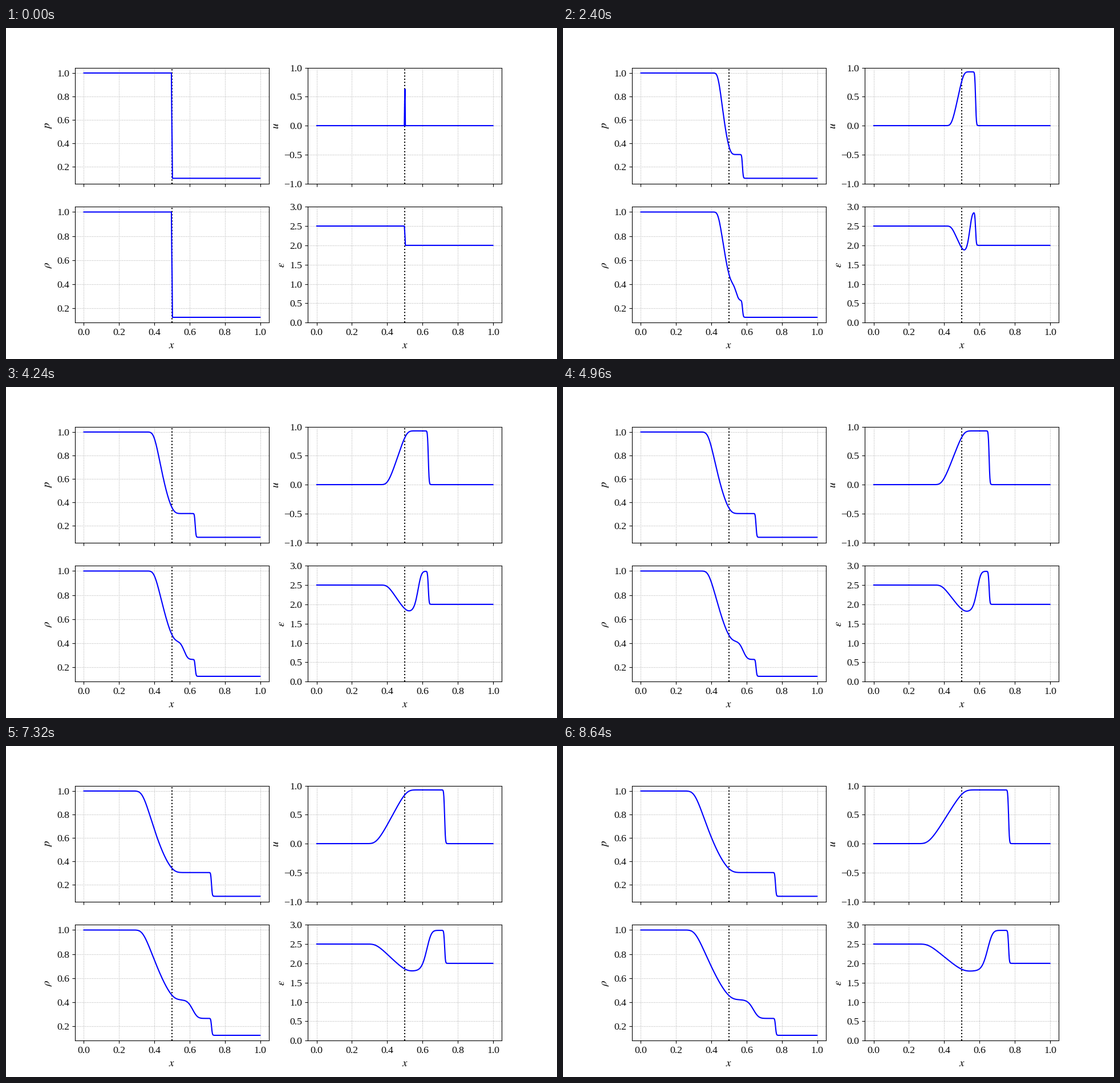
Animation of 966x580 px, one loop 8680 ms. Source, as a matplotlib script:

```python
import numpy as np
import matplotlib.pyplot as plt
from matplotlib.animation import FuncAnimation

plt.rcParams.update({
    "font.family": "Liberation Serif",
    "mathtext.fontset": "stix",
    "text.hinting": "native",
    "text.hinting_factor": 1,
    "xtick.labelsize": 12,
    "ytick.labelsize": 12,
    "axes.labelsize": 14,
})

GAMMA = 1.4
CELLS = 500
CFL = 0.75
FRAMES = 217
DX = 1 / CELLS
X = (np.arange(CELLS) + 0.5) * DX


def primitives(q):
    rho, mom, energy = q
    u = mom / rho
    eps = energy / rho - 0.5 * u**2
    p = (GAMMA - 1) * rho * eps
    return p, u, rho, eps


def step(q):
    """Advance the Euler equations once, with one global wave speed."""
    p, u, rho, _ = primitives(q)
    speed = np.max(np.abs(u) + np.sqrt(GAMMA * p / rho))
    flux = np.array([q[1], q[1] * u + p, (q[2] + p) * u])
    face = 0.5 * (flux[:, :-1] + flux[:, 1:] - speed * np.diff(q))
    new = q.copy()
    new[:, 1:-1] -= CFL / speed * np.diff(face)
    return new


def solve():
    left = X < 0.5
    rho = np.where(left, 1.0, 0.125)
    p = np.where(left, 1.0, 0.1)
    q = np.array([rho, 0 * rho, p / (GAMMA - 1)])
    states = []
    for _ in range(FRAMES):
        q = step(q)
        states.append(primitives(q))
    return states


states = solve()

# label, y limits, y ticks
panels = [
    ("$p$", (0.055, 1.045), np.arange(1, 6) / 5),
    ("$u$", (-1, 1), np.arange(-2, 3) / 2),
    (r"$\rho$", (0.08125, 1.04375), np.arange(1, 6) / 5),
    (r"$\varepsilon$", (0, 3), np.arange(7) / 2),
]

fig, axes = plt.subplots(2, 2, sharex=True, figsize=(9.66, 5.8), dpi=100)
fig.subplots_adjust(left=0.125, right=0.9, bottom=0.11, top=0.88,
                    wspace=0.2, hspace=0.2)

lines = []
for ax, (label, ylim, ticks) in zip(axes.flat, panels):
    ax.axvline(0.5, color="black", ls=":", lw=1.5)
    lines += ax.plot(X, X * 0, color="blue", lw=1.5)
    ax.grid(ls=":")
    ax.set_ylabel(label)
    ax.set_xlim(-0.05, 1.05)
    ax.set_xticks(np.arange(6) / 5)
    ax.set_ylim(ylim)
    ax.set_yticks(ticks)
for ax in axes[1]:
    ax.set_xlabel("$x$")


def update(i):
    for line, values in zip(lines, states[i]):
        line.set_ydata(values)
    return lines


anim = FuncAnimation(fig, update, frames=FRAMES, interval=40,
                     repeat=True, repeat_delay=0, blit=True)
plt.show()
```
